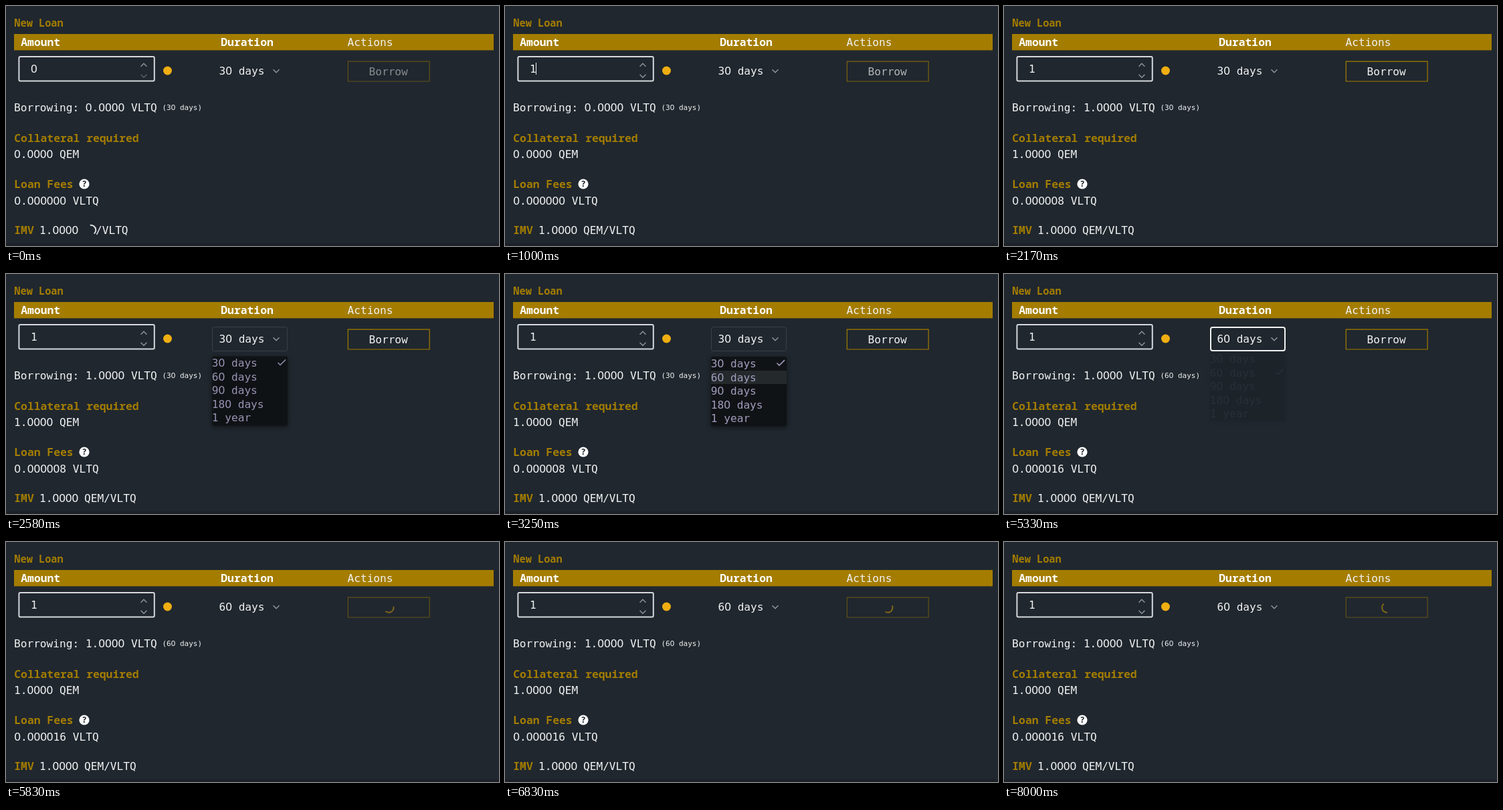
These frames come from a looping animation (737 by 360 pixels, 8080 ms). An HTML page with a canvas:

```html
<!DOCTYPE html>
<html lang="en">
<head>
<meta charset="utf-8">
<title>New Loan</title>
<style>
  html, body { margin: 0; width: 100%; height: 100%; overflow: hidden; background: #20272e; }
  canvas { display: block; width: 737px; height: 360px; }
</style>
</head>
<body>
<canvas id="stage" width="737" height="360"></canvas>
<script>
const ctx = document.getElementById('stage').getContext('2d');
const LOOP = 8080, SPIN = 508;
const BG = '#20272e', GOLD = '#a47d00', WHITE = '#f1f2f3', GREY = '#92979c';
const COIN = 'VLTQ', TOKEN = 'QEM';
const OPTIONS = ['30 days', '60 days', '90 days', '180 days', '1 year'];

const within = (t, from, to) => t >= from && t < to;

// Monospaced text on a cell grid; zeros come from the sans face, without a dot or slash.
function grid(str, x, y, color, style, mono, sans) {
  const monoFont = `${style} "${mono}", monospace`;
  const sansFont = `${style} "${sans}", sans-serif`;
  ctx.fillStyle = color;
  ctx.textAlign = 'center';
  ctx.font = monoFont;
  const cell = ctx.measureText('M').width;
  [...str].forEach((ch, i) => {
    ctx.font = ch === '0' ? sansFont : monoFont;
    ctx.fillText(ch, x + (i + 0.5) * cell, y);
  });
}

const text = (str, x, y, color = WHITE, size = 16.15) =>
  grid(str, x, y, color, `400 ${size}px`, 'DejaVu Sans Mono', 'DejaVu Sans');

const bold = (str, x, y, color = GOLD, size = 16.35) =>
  grid(str, x, y, color, `700 ${size}px`, 'Noto Sans Mono', 'Noto Sans');

function rect(x, y, w, h, color) {
  ctx.fillStyle = color;
  ctx.fillRect(x, y, w, h);
}

function frame(x, y, w, h, color, line, radius = 2) {
  ctx.strokeStyle = color;
  ctx.lineWidth = line;
  ctx.beginPath();
  ctx.roundRect(x + line / 2, y + line / 2, w - line, h - line, radius);
  ctx.stroke();
}

function disc(x, y, r, color) {
  ctx.fillStyle = color;
  ctx.beginPath();
  ctx.arc(x, y, r, 0, Math.PI * 2);
  ctx.fill();
}

function path(points, color, line = 1.4) {
  ctx.strokeStyle = color;
  ctx.lineWidth = line;
  ctx.beginPath();
  points.forEach(([x, y]) => ctx.lineTo(x, y));
  ctx.stroke();
}

// dir 1 points down, -1 points up
const chevron = (x, y, dir, color) =>
  path([[x - 4.5, y - 2.2 * dir], [x, y + 2.3 * dir], [x + 4.5, y - 2.2 * dir]], color);

function spinner(x, y, color, turns) {
  const mid = turns * Math.PI * 2, half = 1.3;
  ctx.strokeStyle = color;
  ctx.lineWidth = 2;
  ctx.beginPath();
  ctx.arc(x, y, 7.2, mid - half, mid + half);
  ctx.stroke();
}

function amountField(t) {
  const value = t < 580 ? '0' : t < 1000 ? '' : '1';
  frame(18.4, 75, 204.4, 38.4, '#d6d9dc', 2);
  text(value, 37, 100);
  if (within(t, 330, 1670)) rect(value ? 46 : 37, 85, 1, 18, WHITE);
  chevron(206, 88.5, -1, GREY);
  chevron(206, 105, 1, t < 1000 ? '#5a6167' : GREY);
  disc(241.5, 97, 6.5, '#efae12');
}

function durationField(t, days) {
  if (within(t, 4080, 5580)) frame(308, 79, 113, 37, WHITE, 2, 3);
  else if (within(t, 2250, 4080)) frame(308, 79, 113, 37, t < 2330 ? '#2b3239' : '#394047', 1, 3);
  text(days, 318.5, 103);
  chevron(404, 97.5, 1, GREY);
}

function borrowButton(t) {
  const loading = t >= 5830;
  ctx.globalAlpha = loading || t < 1000 ? 0.5 : t < 1080 ? 0.7 : t < 1170 ? 0.9 : 1;
  frame(510.7, 82.6, 123, 31, GOLD, 1.2, 0);
  if (!loading) text('Borrow', 542.5, 104);
  ctx.globalAlpha = 1;
  if (loading) spinner(572.3, 98.5, '#80651a', 1 / 6 + (t - 5830) / SPIN);
}

function menu(dy, alpha, checked, active) {
  ctx.save();
  ctx.globalAlpha = alpha;
  ctx.translate(0, dy);
  ctx.shadowColor = 'rgba(0,0,0,.5)';
  ctx.shadowBlur = 7;
  ctx.shadowOffsetY = 2;
  ctx.fillStyle = '#101315';
  ctx.beginPath();
  ctx.roundRect(308, 124, 113, 104, 3);
  ctx.fill();
  ctx.shadowColor = 'transparent';
  if (active >= 0) rect(308, 124.5 + active * 20.5, 113, 20, '#24292b');
  OPTIONS.forEach((label, i) => text(label, 307.8, 140 + i * 20.5, '#a09dbe'));
  const y = 133.5 + checked * 20.5;
  path([[406.5, y], [410, y + 3.6], [418, y - 4.4]], '#a09dbe', 1.5);
  ctx.restore();
}

function dropdown(t) {
  if (within(t, 2500, 2580)) menu(-4, 0.5, 0, -1);
  else if (within(t, 2580, 2670)) menu(-0.6, 0.93, 0, -1);
  else if (within(t, 2670, 4080)) menu(0, 1, 0, t < 3080 ? -1 : t < 3170 ? 0 : 1);
  else if (within(t, 4080, 5830)) menu(-7, 0.1, 1, -1);
}

function summary(t, days) {
  text(`Borrowing: ${t < 1080 ? 0 : 1}.0000 ${COIN}`, 12, 158);
  text(`(${days})`, 233.5, 156, WHITE, 11);

  bold('Collateral required', 12.3, 203.6);
  text(`${t < 2170 ? 0 : 1}.0000 ${TOKEN}`, 12, 228);

  bold('Loan Fees', 12.3, 272.6);
  disc(117, 267, 7.6, '#fff');
  bold('?', 113.4, 271.3, BG, 12);
  const fee = t < 1170 ? '00' : t < 4080 ? '08' : '16';
  text(`0.0000${fee} ${COIN}`, 12.3, 298);

  // The rate is fetched again every three seconds.
  bold('IMV', 12.3, 342);
  text('1.0000', 50, 342);
  if (t % 3000 < 170 && t < 7000) {
    spinner(127, 336, '#dcdee0', -0.07 + t / SPIN);
    text('/' + COIN, 134, 342);
  } else {
    text(`${TOKEN}/${COIN}`, 117, 342);
  }
}

function draw(t) {
  const days = OPTIONS[t < 4080 ? 0 : 1];
  rect(0, 0, 737, 360, BG);
  rect(0, 356, 737, 4, '#1b2127');
  bold('New Loan', 12.3, 31, GOLD, 15.3);
  rect(12, 42, 717, 24.4, GOLD);
  bold('Amount', 22.3, 60, '#fff');
  bold('Duration', 321.3, 60, '#fff');
  text('Actions', 510.5, 60);
  amountField(t);
  durationField(t, days);
  borrowButton(t);
  summary(t, days);
  dropdown(t);
}

// The screen refreshes twelve times a second.
const start = performance.now();
function tick() {
  const t = (performance.now() - start) % LOOP;
  const step = Math.floor((t + 4) * 0.012);
  draw(Math.round(step * 100 / 12) * 10);
  requestAnimationFrame(tick);
}
tick();
</script>
</body>
</html>
```
